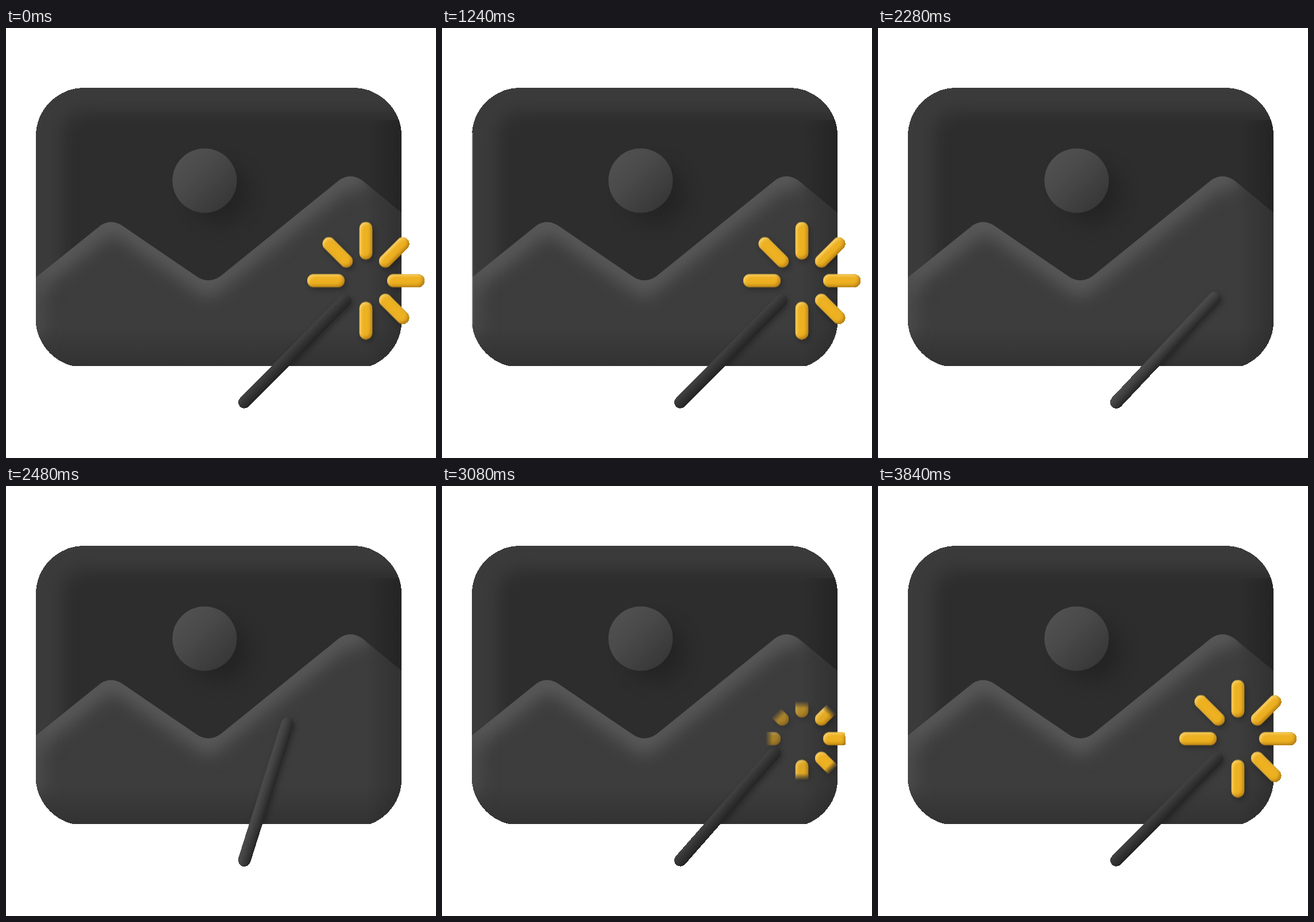
Write an HTML page without scripts that moves like this. It is 748x748 px and loops after 4.8 s.

```html
<!DOCTYPE html>
<html lang="en">
<head>
<meta charset="utf-8">
<title>Picture and wand</title>
<style>
  html, body { margin: 0; width: 100%; height: 100%; overflow: hidden; background: #fff; }
  svg { display: block; width: 100vw; height: 100vh; }
  filter { color-interpolation-filters: sRGB; }

  .sheen { animation: sheen 4.8s linear infinite; }
  @keyframes sheen {
    0%, .83% { stroke-dasharray: 0px 0px 0px 2000px; }
    5.42%  { stroke-dasharray: 0px 0px 145px 2000px; }
    11.67% { stroke-dasharray: 0px 185px 156px 2000px; }
    23.33% { stroke-dasharray: 0px 533px 302px 2000px; }
    25.83% { stroke-dasharray: 0px 607px 336px 2000px; }
    36.67%, 100% { stroke-dasharray: 0px 943px 0px 2000px; }
  }

  .wand { animation: swing 4.8s ease-in-out infinite; }
  @keyframes swing {
    0%, 46.67% { transform: rotate(44.8deg); }
    51.8% { transform: rotate(17.5deg); }
    57.9% { transform: rotate(44.8deg); }
    64%   { transform: rotate(41.3deg); }
    69%, 100% { transform: rotate(44.8deg); }
  }
  .lit { animation: lit 4.8s step-end infinite; }
  @keyframes lit { 0%, 58.33% { opacity: 0; } 46.67% { opacity: 1; } }

  .rays { animation: blank 4.8s step-end infinite; }
  @keyframes blank { 0%, 51.87% { visibility: visible; } 46.67% { visibility: hidden; } }

  /* each ray wipes outwards while it fades in */
  .wipe rect { animation: wipe 4.8s linear var(--d, 0ms) infinite both; }
  @keyframes wipe {
    0%, 46.66% { transform: translateX(114px); opacity: 1; }
    46.67%, 52.08% { transform: translateX(37px); opacity: 0; }
    54.38% { transform: translateX(45.25px); opacity: 0; }
    62.5%  { transform: translateX(74.5px); opacity: 1; }
    73.48%, 100% { transform: translateX(114px); opacity: 1; }
  }
</style>
</head>
<body>
<svg viewBox="0 0 748 748">
  <defs>
    <filter id="hard" filterUnits="userSpaceOnUse" x="0" y="0" width="748" height="748">
      <feComponentTransfer><feFuncA type="discrete" tableValues="0 1"/></feComponentTransfer>
    </filter>
    <filter id="soft" filterUnits="userSpaceOnUse" x="-50" y="0" width="850" height="748">
      <feGaussianBlur stdDeviation="15"/>
    </filter>
    <filter id="shade" filterUnits="userSpaceOnUse" x="360" y="280" width="388" height="420">
      <feDropShadow dx="3" dy="4" stdDeviation="5" flood-color="#000" flood-opacity=".3"/>
    </filter>
    <filter id="bevel" filterUnits="userSpaceOnUse" x="500" y="320" width="248" height="240">
      <feGaussianBlur in="SourceAlpha" stdDeviation="2.5" result="b"/>
      <feOffset in="b" dx="3" dy="3"/>
      <feComposite in="SourceAlpha" operator="out" result="up"/>
      <feFlood flood-color="#ffdc80" flood-opacity=".75"/>
      <feComposite in2="up" operator="in" result="light"/>
      <feOffset in="b" dx="-3" dy="-3"/>
      <feComposite in="SourceAlpha" in2="" operator="over" result="x"/>
      <feOffset in="b" dx="-3" dy="-3" result="o"/>
      <feComposite in="SourceAlpha" in2="o" operator="out" result="down"/>
      <feFlood flood-color="#a9730f" flood-opacity=".75"/>
      <feComposite in2="down" operator="in" result="dark"/>
      <feMerge>
        <feMergeNode in="SourceGraphic"/><feMergeNode in="light"/><feMergeNode in="dark"/>
      </feMerge>
    </filter>

    <linearGradient id="sun" x1=".15" y1=".15" x2=".85" y2=".85">
      <stop stop-color="#505050"/><stop offset=".35" stop-color="#4a4a4a"/><stop offset="1" stop-color="#383838"/>
    </linearGradient>
    <linearGradient id="right"><stop stop-opacity="0"/><stop offset="1" stop-opacity=".2"/></linearGradient>
    <linearGradient id="bottom" x2="0" y2="1"><stop stop-opacity="0"/><stop offset="1" stop-opacity=".17"/></linearGradient>
    <linearGradient id="dim">
      <stop stop-color="#434343"/><stop offset=".4" stop-color="#363636"/><stop offset="1" stop-color="#242424"/>
    </linearGradient>
    <linearGradient id="bright">
      <stop stop-color="#4d4d4d"/><stop offset=".4" stop-color="#414141"/><stop offset="1" stop-color="#272727"/>
    </linearGradient>
    <linearGradient id="front" gradientUnits="userSpaceOnUse" x1="-12" x2="0">
      <stop stop-color="#fff"/><stop offset="1" stop-color="#fff" stop-opacity="0"/>
    </linearGradient>

    <path id="hills" d="M52 434L165 343Q184 331 204 345L330 431Q352 447 374 431L578 266Q599 250 621 266L688 321V600H52Z"/>
    <clipPath id="card">
      <path d="M136 104H604A84 84 0 0 1 688 188V510A84 84 0 0 1 633 588H118A84 84 0 0 1 52 510V188A84 84 0 0 1 136 104Z"/>
    </clipPath>
    <clipPath id="land"><use href="#hills"/></clipPath>
    <clipPath id="lane"><rect x="30" y="-15" width="90" height="30"/></clipPath>

    <rect id="ray" x="37" y="-11.2" width="65" height="22.4" rx="11.2"/>
    <mask id="wipes" maskUnits="userSpaceOnUse" x="-130" y="-130" width="260" height="260">
      <g class="wipe" fill="url(#front)">
        <g transform="rotate(0)" clip-path="url(#lane)"><rect x="-150" y="-15" width="150" height="30"/></g>
        <g transform="rotate(45)" clip-path="url(#lane)"><rect x="-150" y="-15" width="150" height="30" style="--d:40ms"/></g>
        <g transform="rotate(90)" clip-path="url(#lane)"><rect x="-150" y="-15" width="150" height="30" style="--d:110ms"/></g>
        <g transform="rotate(180)" clip-path="url(#lane)"><rect x="-150" y="-15" width="150" height="30" style="--d:233ms"/></g>
        <g transform="rotate(225)" clip-path="url(#lane)"><rect x="-150" y="-15" width="150" height="30" style="--d:225ms"/></g>
        <g transform="rotate(270)" clip-path="url(#lane)"><rect x="-150" y="-15" width="150" height="30" style="--d:205ms"/></g>
        <g transform="rotate(315)" clip-path="url(#lane)"><rect x="-150" y="-15" width="150" height="30" style="--d:100ms"/></g>
      </g>
    </mask>
  </defs>

  <g filter="url(#hard)">
    <g clip-path="url(#card)">
      <!-- sky -->
      <rect x="52" y="103" width="636" height="490" fill="#3b3b3b"/>
      <rect x="97" y="146" width="680" height="520" rx="40" fill="#2d2d2d" filter="url(#soft)"/>
      <rect x="630" y="160" width="58" height="250" fill="url(#right)"/>
      <circle cx="372" cy="288" r="52" fill="#1e1e1e" opacity=".55" filter="url(#soft)"/>
      <circle cx="345.5" cy="265.5" r="56" fill="url(#sun)"/>
      <!-- hills -->
      <g clip-path="url(#land)">
        <use href="#hills" fill="#3d3d3d"/>
        <path d="M-10 484L184 331L352 447L599 250L625 270" fill="none" stroke="#5a5a5a" stroke-width="40" stroke-linejoin="round" filter="url(#soft)"/>
        <path d="M48 430V540" stroke="#4c4c4c" stroke-width="36" filter="url(#soft)"/>
        <rect x="625" y="250" width="63" height="340" fill="url(#right)"/>
        <rect x="52" y="520" width="636" height="68" fill="url(#bottom)"/>
      </g>
    </g>
    <path class="sheen" d="M618 104H136A84 84 0 0 0 52 188V517" fill="none" stroke="#fff" stroke-width="3" opacity=".5"/>

    <g filter="url(#shade)">
      <g transform="translate(414.5 651)">
        <g class="wand">
          <rect x="-10.5" y="-259.5" width="21" height="270" rx="10.5" fill="url(#dim)"/>
          <rect class="lit" x="-10.5" y="-259.5" width="21" height="270" rx="10.5" fill="url(#bright)"/>
        </g>
      </g>
    </g>

    <g class="rays" filter="url(#shade)">
      <g transform="translate(626 439.5)" mask="url(#wipes)">
        <g transform="translate(-626 -439.5)" filter="url(#bevel)">
          <g transform="translate(626 439.5)" fill="#edb122">
            <use href="#ray"/>
            <use href="#ray" transform="rotate(45)"/>
            <use href="#ray" transform="rotate(90)"/>
            <use href="#ray" transform="rotate(180)"/>
            <use href="#ray" transform="rotate(225)"/>
            <use href="#ray" transform="rotate(270)"/>
            <use href="#ray" transform="rotate(315)"/>
          </g>
        </g>
      </g>
    </g>
  </g>
</svg>
</body>
</html>
```
